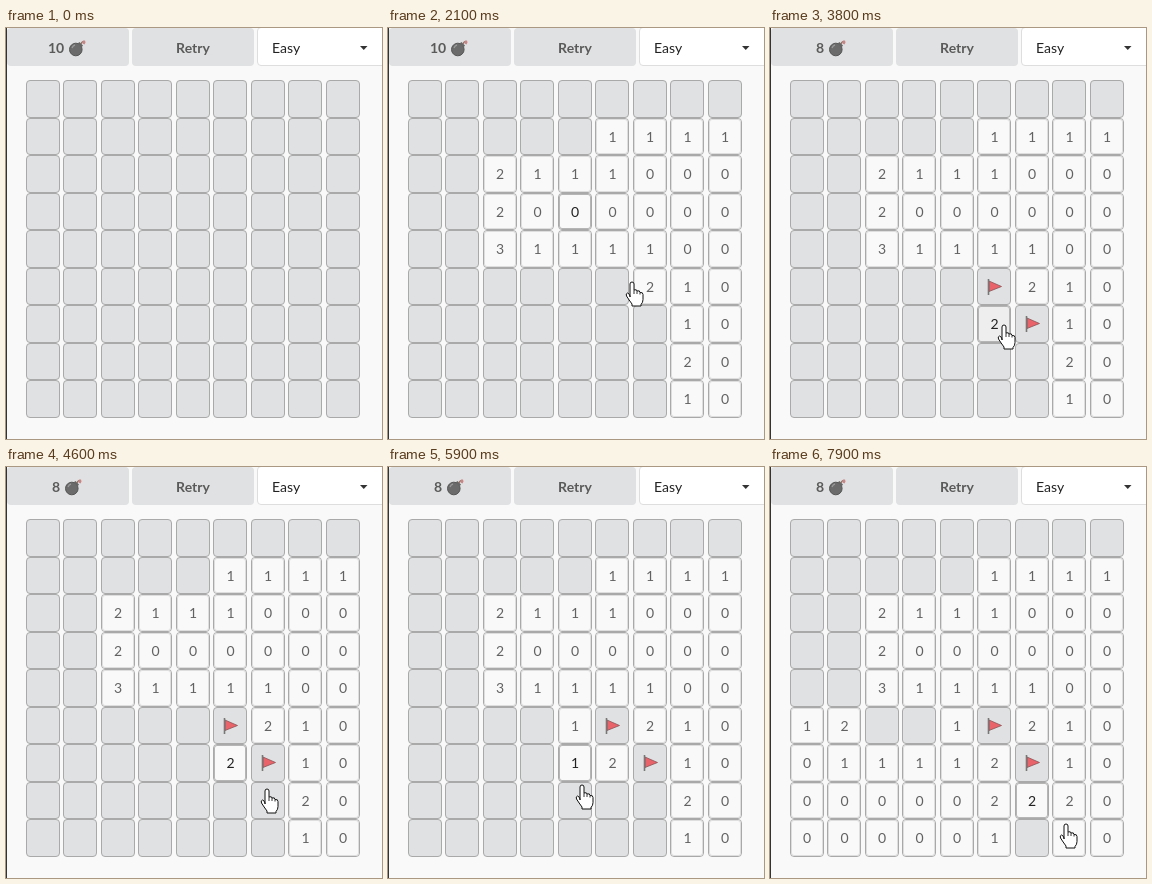
An HTML page with a canvas that plays this animation: 376x411 px, repeating every 8 s.

```html
<!DOCTYPE html>
<html lang="en">
<head>
<meta charset="utf-8">
<title>Minesweeper</title>
<style>
  html, body { margin: 0; width: 376px; height: 411px; overflow: hidden; background: #f9f9f9; }
  canvas { display: block; }
</style>
</head>
<body>
<canvas id="stage" width="376" height="411"></canvas>
<script>
const ctx = document.getElementById('stage').getContext('2d');
const LOOP = 8000, STEP = 100, SIZE = 9, PITCH = 37.5;
const HOVER = 400, FADE = 150, MOVE = 400;
const PAGE = [249, 249, 249], GREY = [224, 225, 226], DARK = [201, 202, 203], PRESSED = [216, 217, 218];

const mines = ['00', '70', '11', '41', '13', '14', '25', '55', '66', '68'];   // column, row

const clicks = [
  { t: 1300, cell: '43' },
  { t: 2600, cell: '55', flag: true },
  { t: 3200, cell: '66', flag: true },
  { t: 3700, cell: '56' },
  { t: 5500, cell: '45' },
  { t: 5700, cell: '46' },
  { t: 6400, cell: '47' },
  { t: 7300, cell: '67' }
];

// Pointer stops: arrival time and tip position
const stops = [
  [100, 345, 62], [600, 174, 172], [2100, 248, 254], [2400, 216, 255], [2900, 267, 292],
  [3600, 226, 292], [4100, 272, 326], [4400, 260, 322], [5200, 193, 262], [5900, 193, 318],
  [6300, 193, 333], [6600, 224, 333], [7100, 261, 333], [7900, 295, 357]
];

const clamp = v => Math.max(0, Math.min(1, v));
const ease = v => { const k = clamp(v); return k * k * (3 - 2 * k); };
const mix = (a, b, k) => a.map((v, i) => v + (b[i] - v) * k);
const rgb = c => `rgb(${c.map(Math.round)})`;

function neighbours(cell) {
  const list = [];
  for (let dx = -1; dx <= 1; dx++)
    for (let dy = -1; dy <= 1; dy++) {
      const x = +cell[0] + dx, y = +cell[1] + dy;
      if ((dx || dy) && x >= 0 && y >= 0 && x < SIZE && y < SIZE) list.push(`${x}${y}`);
    }
  return list;
}
const number = cell => neighbours(cell).filter(c => mines.includes(c)).length;

// Opening an empty cell spreads to everything around it.
const openTime = {};
function open(cell, t) {
  if (cell in openTime) return;
  openTime[cell] = t;
  if (!number(cell)) neighbours(cell).forEach(c => open(c, t));
}
clicks.filter(c => !c.flag).forEach(c => open(c.cell, c.t));

const hand = new Path2D('M-1 15V2a2 2 0 0 1 4 0v6q3-1 3 1q3-1 3 1.5q3-.5 3 2v5q0 3-2 5v1.5h-9v-2' +
                        'q-3-4-5.5-8q-1-2.5 1-3q1.5 0 2.5 3z');
const handFolds = new Path2D('M3 8v4M6 9v3M9 10.5v2');

function box(x, y, w, h, r, fill, line) {
  ctx.beginPath();
  ctx.roundRect(x, y, w, h, r);
  if (fill) { ctx.fillStyle = fill; ctx.fill(); }
  if (line) { ctx.strokeStyle = line; ctx.lineWidth = 1; ctx.stroke(); }
}

function label(text, x, y, color, weight = 400, align = 'center') {
  ctx.font = `${weight} 14px Lato, sans-serif`;
  ctx.textAlign = align;
  ctx.fillStyle = color;
  ctx.fillText(text, x, y);
}

function shape(path, fill, line, width = 1) {
  const p = path instanceof Path2D ? path : new Path2D(path);
  if (fill) { ctx.fillStyle = fill; ctx.fill(p); }
  if (line) { ctx.strokeStyle = line; ctx.lineWidth = width; ctx.stroke(p); }
}

function at(x, y, draw) {
  ctx.save();
  ctx.translate(x, y);
  draw();
  ctx.restore();
}

function bomb() {
  shape('M.5 9.5a6.3 6.3 0 1 0 12.6 0a6.3 6.3 0 1 0-12.6 0z', '#6b6b6b', '#555');
  shape('M8.5 3.5l2-1.5l3.5 3.5l-1.5 2z', '#666');
  shape('M12 4q1-3 3-2', null, '#8a6d60', 1.3);
  shape('M14 .5l2 0l.5 2l-1 2l-2-1z', '#c98484');
  shape('M3 8q1-2.5 3-3', null, '#999', 1.3);
}

function flag() {
  shape('M2 2L14.5 7.5L2 12.5z', '#e8636a', '#8c5457', .8);
  shape('M1.5 0V16', null, '#777', 1.6);
}

function header(t) {
  const count = mines.length - clicks.filter(c => c.flag && t >= c.t).length;
  const shift = count < 10 ? 4 : 0;
  box(1, 0, 122, 38, 4, rgb(GREY));
  box(126, 0, 122, 38, 4, rgb(GREY));
  box(251.5, -.5, 130, 38, 3.5, '#fff', '#dedede');
  label(count, 42 + shift, 25, '#5a5a5a', 700, 'left');
  at(63 - shift, 12, bomb);
  label('Retry', 187, 25, '#5a5a5a', 700);
  label('Easy', 266, 25, '#222', 400, 'left');
  shape('M354 18h7.5l-3.75 4z', '#333');
}

function drawCell(col, row, t, lastClick) {
  const cell = `${col}${row}`;
  const left = 20 + PITCH * col, x = Math.floor(left);
  const y = Math.round(52 + PITCH * row), h = Math.round(52 + PITCH * (row + 1)) - y;
  const isOpen = t >= openTime[cell];
  const focused = isOpen && lastClick?.cell === cell;
  const hovered = clicks.some(c => c.cell === cell && t < c.t && t >= c.t - HOVER);
  const fade = isOpen ? clamp((t - openTime[cell]) / FADE) : 0;
  const base = hovered ? DARK : focused ? PRESSED : GREY;

  box(x + .5, y + .5, 33, h - 1, 3.5, rgb(mix(base, PAGE, fade)), '#a9a9a9');
  if (fade) box(x + 1.5, y + 1.5, 31, h - 3, 2.5, null, focused ? '#b5b5b5' : '#dedede');
  if (isOpen) label(number(cell), left + 17, y + 24, focused ? '#222' : '#626262');
  if (clicks.some(c => c.flag && c.cell === cell && t >= c.t)) at(x + 10, y + 11, flag);
}

function pointer(t) {
  if (t < 100 || (t >= 1300 && t < 1900)) return;
  const [x, y] = stops.reduce((p, [arrive, ...stop]) =>
    mix(p, stop, ease((t - arrive) / MOVE + 1)), stops[0].slice(1));
  at(Math.round(x), Math.round(y), () => {
    ctx.lineJoin = 'round';
    shape(hand, '#fff', '#111');
    shape(handFolds, null, '#333');
  });
}

function frame(now) {
  const t = Math.floor(now % LOOP / STEP) * STEP;
  const lastClick = clicks.findLast(c => t >= c.t);
  ctx.fillStyle = rgb(PAGE);
  ctx.fillRect(0, 0, 376, 411);
  header(t);
  for (let row = 0; row < SIZE; row++)
    for (let col = 0; col < SIZE; col++) drawCell(col, row, t, lastClick);
  ctx.fillStyle = '#333';
  ctx.fillRect(0, 0, 1, 411);
  pointer(t);
}

let start;
function tick(now) {
  start ??= now;
  frame(now - start);
  requestAnimationFrame(tick);
}
frame(0);
requestAnimationFrame(tick);
</script>
</body>
</html>
```
